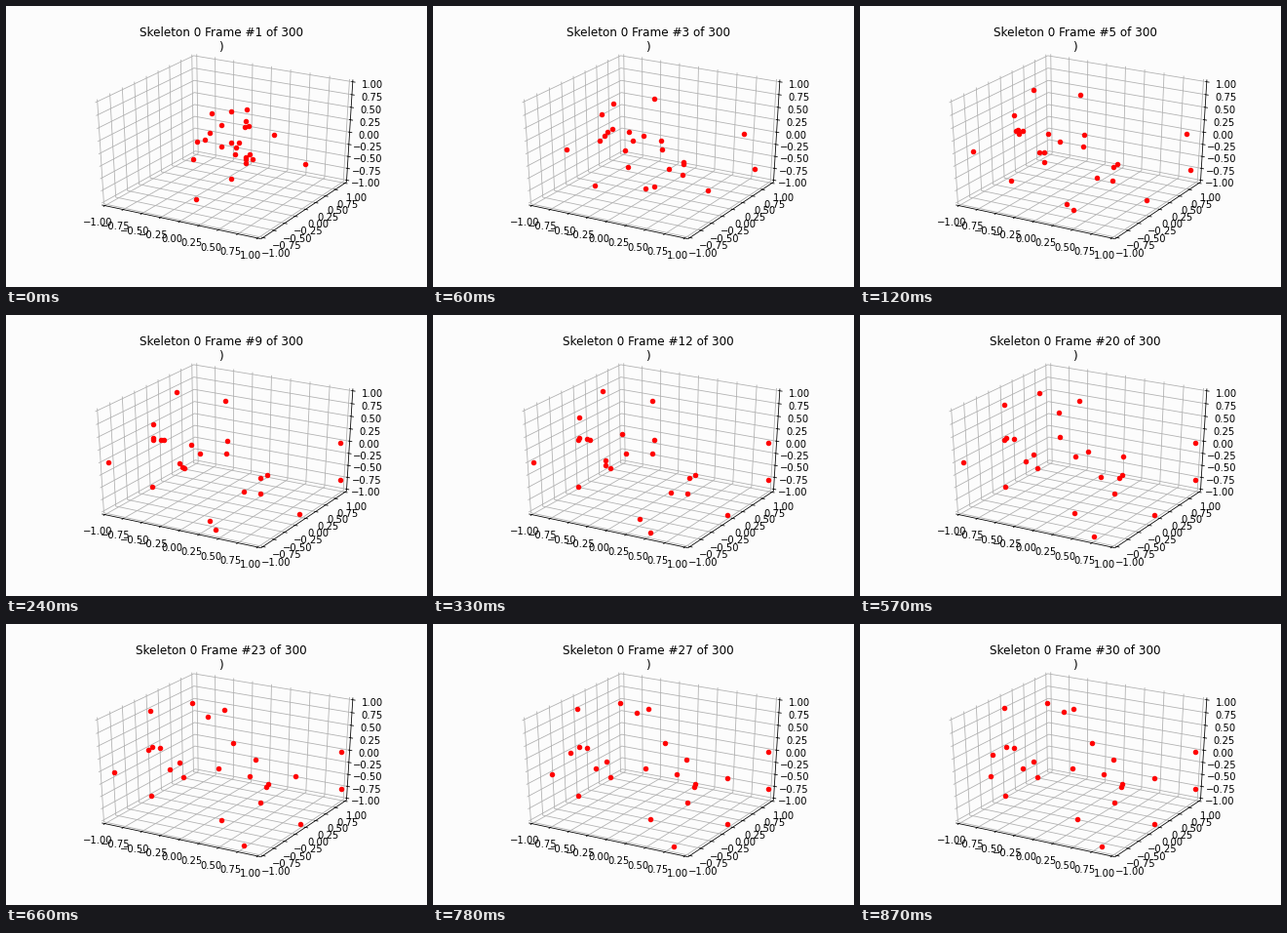
A matplotlib script that plays this animation: 432x288 px, repeating every 0.9 s.

```python
import numpy as np
import matplotlib.pyplot as plt
from matplotlib.animation import FuncAnimation

W, H, DPI = 432, 288, 72
FRAMES, INTERVAL = 30, 30
PAPER, GRID, DOT = "#fcfcfc", "#b0b0b0", "#ff0000"

plt.rcParams["font.family"] = "DejaVu Sans"
fig = plt.figure(figsize=(W / DPI, H / DPI), dpi=DPI, facecolor=PAPER)
ax = fig.add_axes([0, 0, 1, 1])
ax.set(xlim=(0, W), ylim=(0, H))
ax.axis("off")

# ---- perspective box ----
LEFT, BOTTOM = 0.125 * W, 0.125 * H
WIDTH, HEIGHT = 0.775 * W, 0.755 * H
DIST = 10
AZIM, ELEV = np.radians(-60), np.radians(30)
TOWARD = np.array([np.cos(AZIM) * np.cos(ELEV),
                   np.sin(AZIM) * np.cos(ELEV),
                   np.sin(ELEV)])
RIGHT = np.array([-np.sin(AZIM), np.cos(AZIM), 0])
UP = np.cross(TOWARD, RIGHT)

DELTA = 2 / 12
EDGE = 1 + DELTA / 4
LABEL_GAP = 11.5 * 48 / (WIDTH + HEIGHT) * DELTA
BACK = np.array([-EDGE, EDGE, -EDGE])


def project(p):
    """Data coordinates to stage pixels, y upwards."""
    p = np.asarray(p) / 2
    depth = DIST - p @ TOWARD
    x, y = p @ RIGHT / depth, p @ UP / depth
    return (LEFT + WIDTH * (x + 0.095) / 0.185,
            BOTTOM + HEIGHT * (y + 0.095) / 0.185)


def line(points, color):
    xs, ys = zip(*map(project, points))
    ax.plot(xs, ys, color=color, lw=0.8, solid_capstyle="butt", zorder=1)


def moved(p, axis, value):
    q = np.array(p, float)
    q[axis] = value
    return q


def draw_axis(axis, flip, tick_axis, tick_sign):
    start = moved(BACK, flip, -BACK[flip])
    ticks = np.linspace(-1, 1, 9)
    for v in ticks:
        corner = moved(BACK, axis, v)
        a, b = (axis + 1) % 3, (axis + 2) % 3
        line([moved(corner, a, -corner[a]), corner,
              moved(corner, b, -corner[b])], GRID)
    line([start, moved(start, axis, -start[axis])], "black")
    for v in ticks:
        pos = moved(start, axis, v)
        base = pos[tick_axis]
        line([moved(pos, tick_axis, base + k * tick_sign * DELTA)
              for k in (0.1, -0.2)], "black")
        away = moved(np.sign(pos) * LABEL_GAP, axis, 0)
        x, y = project(pos + away)
        ax.text(x, y, f"{v:.2f}".replace("-", "\u2212"), size=10,
                ha="center", va="top", zorder=2)


draw_axis(0, flip=1, tick_axis=1, tick_sign=1)
draw_axis(1, flip=0, tick_axis=0, tick_sign=-1)
draw_axis(2, flip=0, tick_axis=0, tick_sign=-1)


# ---- joints, y downwards ----
def span(i, a, b):
    return np.clip((i - a) / (b - a), 0, 1)


def glide(i):
    return 1 - (1 - span(i, 8, 29)) ** 2


def sweep(i):
    t = span(i, 13.5, 23.5)
    return t * t * (3 - 2 * t)


def late(i):
    return span(i, 15, 29) ** 2


# joints that hold their place once settled
HOLD = [(344, 131), (344, 169), (302, 205), (261, 183), (269, 164),
        (182, 157), (150, 126), (149, 176), (158, 127)]

# joints that go on moving: from, to
MOVES = {
    glide: [((150, 112), (148, 86)), ((189, 133), (209, 90)),
            ((177, 152), (178, 141)), ((180, 157), (167, 148)),
            ((208, 212), (223, 200)), ((214, 222), (248, 228)),
            ((261, 167), (268, 167))],
    sweep: [((174, 78), (192, 81)), ((227, 128), (302, 158)),
            ((198, 142), (260, 139)), ((161, 128), (238, 122)),
            ((225, 142), (218, 148)), ((244, 182), (250, 154))],
    late: [((225, 88), (219, 87)), ((103, 151), (134, 156)),
           ((149, 128), (136, 134))],
}


def pose(i):
    parts = [np.array(HOLD, float)]
    for ease, pairs in MOVES.items():
        a, b = np.array(pairs, float).swapaxes(0, 1)
        parts.append(a + (b - a) * ease(i))
    return np.vstack(parts)


# opening cloud: the pose drawn in around one centre, with some scatter
CENTER = np.array([237, 142])
rest = pose(0)
scatter = np.random.default_rng(4).normal(0, (14, 21), rest.shape)
cloud = CENTER + 0.35 * (rest - rest.mean(axis=0)) + scatter


def joints(i):
    now = pose(i)
    pts = np.round(now + (cloud - now) * np.exp(-i / 2))
    return pts[:, 0] - 0.5, H - pts[:, 1] + 0.5


dots, = ax.plot([], [], "o", color=DOT, ms=20 ** 0.5, mew=1, zorder=5)
title = ax.text(220.8, BOTTOM + 0.92 * HEIGHT + 6, "", size=12,
                ha="center", va="baseline")


def update(i):
    title.set_text(f"Skeleton 0 Frame #{i + 1} of 300\n)")
    dots.set_data(*joints(i))
    return title, dots


anim = FuncAnimation(fig, update, frames=FRAMES, interval=INTERVAL,
                     repeat=True, repeat_delay=0, blit=False)
plt.show()
```
